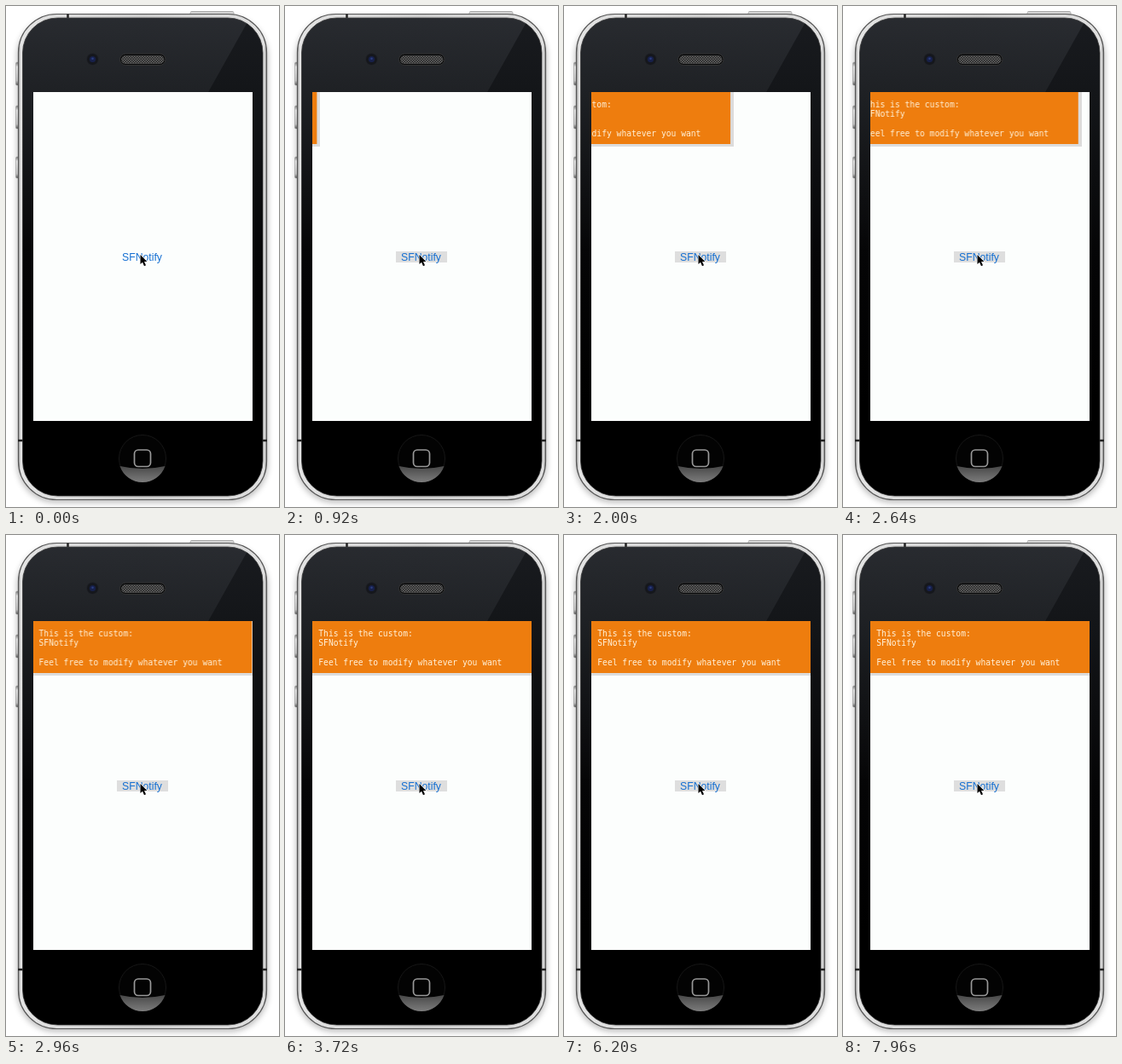
Recreate the animation shown at these times as an HTML page. Size 320 by 588 pixels, loop 8000 ms.

```html
<!DOCTYPE html>
<html lang="en">
<head>
<meta charset="utf-8">
<title>Notification banner</title>
<style>
  html, body { margin: 0; width: 100%; height: 100%; overflow: hidden; background: #fff; }
  svg { display: block; width: 100%; height: 100%; }
  .banner { animation: slide 8s infinite; }
  .note { font: 9.66px "DejaVu Sans Mono", monospace; fill: #fff3dc; white-space: pre; }
  .link { font: 12.25px "Liberation Sans", Arial, sans-serif; fill: #1670d2; }
  .press { animation: press 8s step-end infinite; }
  @keyframes slide {
    0% { transform: translateX(-264px); animation-timing-function: step-end; }
    8.49% { transform: translateX(-257px); animation-timing-function: cubic-bezier(.42, 0, .52, 1); }
    38.34%, 100% { transform: none; }
  }
  @keyframes press {
    0% { opacity: 0; }
    7.5%, 100% { opacity: 1; }
  }
</style>
</head>
<body>
<svg viewBox="0 0 320 588">
  <defs>
    <linearGradient id="steel" x2="1" y2="0">
      <stop offset="0" stop-color="#999"/>
      <stop offset=".01" stop-color="#e4e4e4"/>
      <stop offset=".5" stop-color="#ccc"/>
      <stop offset=".99" stop-color="#e0e0e0"/>
      <stop offset="1" stop-color="#999"/>
    </linearGradient>
    <linearGradient id="glass" x2="0" y2="1">
      <stop offset="0" stop-color="#191b1f"/>
      <stop offset=".17" stop-color="#131518"/>
      <stop offset=".5" stop-color="#050506"/>
      <stop offset=".8" stop-color="#000"/>
    </linearGradient>
    <linearGradient id="gloss" gradientUnits="userSpaceOnUse" x1="150" y1="10" x2="130" y2="300">
      <stop offset="0" stop-color="#dfe8f5" stop-opacity=".08"/>
      <stop offset="1" stop-color="#dfe8f5" stop-opacity="0"/>
    </linearGradient>
    <linearGradient id="home" x2="0" y2="1">
      <stop offset="0" stop-color="#484848"/>
      <stop offset="1" stop-color="#7c7c7c"/>
    </linearGradient>
    <linearGradient id="key" x2="0" y2="1">
      <stop offset="0" stop-color="#777"/>
      <stop offset=".2" stop-color="#e4e4e4"/>
      <stop offset=".8" stop-color="#c4c4c4"/>
      <stop offset="1" stop-color="#555"/>
    </linearGradient>
    <pattern id="mesh" width="3" height="3" patternUnits="userSpaceOnUse">
      <path d="M0 0h3v3h-3z" fill="#666"/>
      <path d="M0 0h1.5v1.5H0zM1.5 1.5H3V3H1.5z" fill="#222"/>
    </pattern>
    <filter id="soft" x="-10%" y="-10%" width="120%" height="120%">
      <feGaussianBlur stdDeviation="3.5"/>
    </filter>
    <clipPath id="screen"><path d="M32 101h257v386H32z"/></clipPath>
    <clipPath id="face"><rect x="19.5" y="14" width="281.5" height="561" rx="41"/></clipPath>
  </defs>

  <rect x="13" y="13" width="294" height="570" rx="46" fill="#000" opacity=".26" filter="url(#soft)"/>

  <g fill="url(#key)" stroke="#999" stroke-width=".6">
    <rect x="11.5" y="66" width="5" height="27" rx="1.5"/>
    <rect x="11.5" y="117" width="5" height="27" rx="1.5"/>
    <rect x="11.5" y="177" width="5" height="25" rx="1.5"/>
    <rect x="216" y="6.5" width="51" height="6" rx="1.5"/>
  </g>

  <rect x="14.5" y="9.5" width="291" height="570" rx="45" fill="url(#steel)" stroke="#555" stroke-width="1.2"/>
  <path d="M72.5 9.5v5M14 510h6M300 510h6" stroke="#222" stroke-width="2.5"/>
  <rect x="19.5" y="14" width="281.5" height="561" rx="41" fill="url(#glass)" stroke="#333" stroke-width=".8"/>
  <path d="M288 10H10v300h110z" fill="url(#gloss)" clip-path="url(#face)"/>

  <circle cx="101.5" cy="62.5" r="7" fill="#15171c" stroke="#24262b" stroke-width=".8"/>
  <circle cx="101.5" cy="62.5" r="3.6" fill="#17204a"/>
  <circle cx="101.5" cy="61.8" r="1.3" fill="#2a3d80"/>
  <rect x="133.5" y="56" width="53.5" height="13.5" rx="6.7" fill="#08090a" stroke="#333"/>
  <rect x="135" y="58" width="50.5" height="10" rx="5" fill="url(#mesh)"/>

  <circle cx="160" cy="531" r="27.5" fill="#030303" stroke="#1c1c1c" stroke-width=".8"/>
  <path d="M133.500 540Q160 546 186.500 540A28 28 0 0 1 133.500 540z" fill="url(#home)"/>
  <rect x="150.500" y="521" width="19" height="19.500" rx="4.500" fill="none" stroke="#999" stroke-width="1.700"/>

  <path d="M32 101h257v386H32z" fill="#fcfefd"/>
  <g clip-path="url(#screen)">
    <g class="banner">
      <path d="M32 162h261v3H32zM289 101h4v61h-4z" fill="#dcdcdc"/>
      <path d="M32 101h257v61H32z" fill="#ee7d0e"/>
      <g class="note">
        <text x="39.300" y="119">This is the custom:</text>
        <text x="39.300" y="130.300">SFNotify</text>
        <text x="39.300" y="152.800">Feel free to modify whatever you want</text>
      </g>
    </g>
  </g>

  <path class="press" d="M130 288h60v13h-60z" fill="#dedede"/>
  <text class="link" x="136" y="299">SFNotify</text>
  <path d="M157.500 292v11l2.500-2.300 2 4.500 2-.9-2-4.400h3.300z" fill="#000" stroke="#fff" stroke-width="1.200" paint-order="stroke"/>
</svg>
</body>
</html>
```
